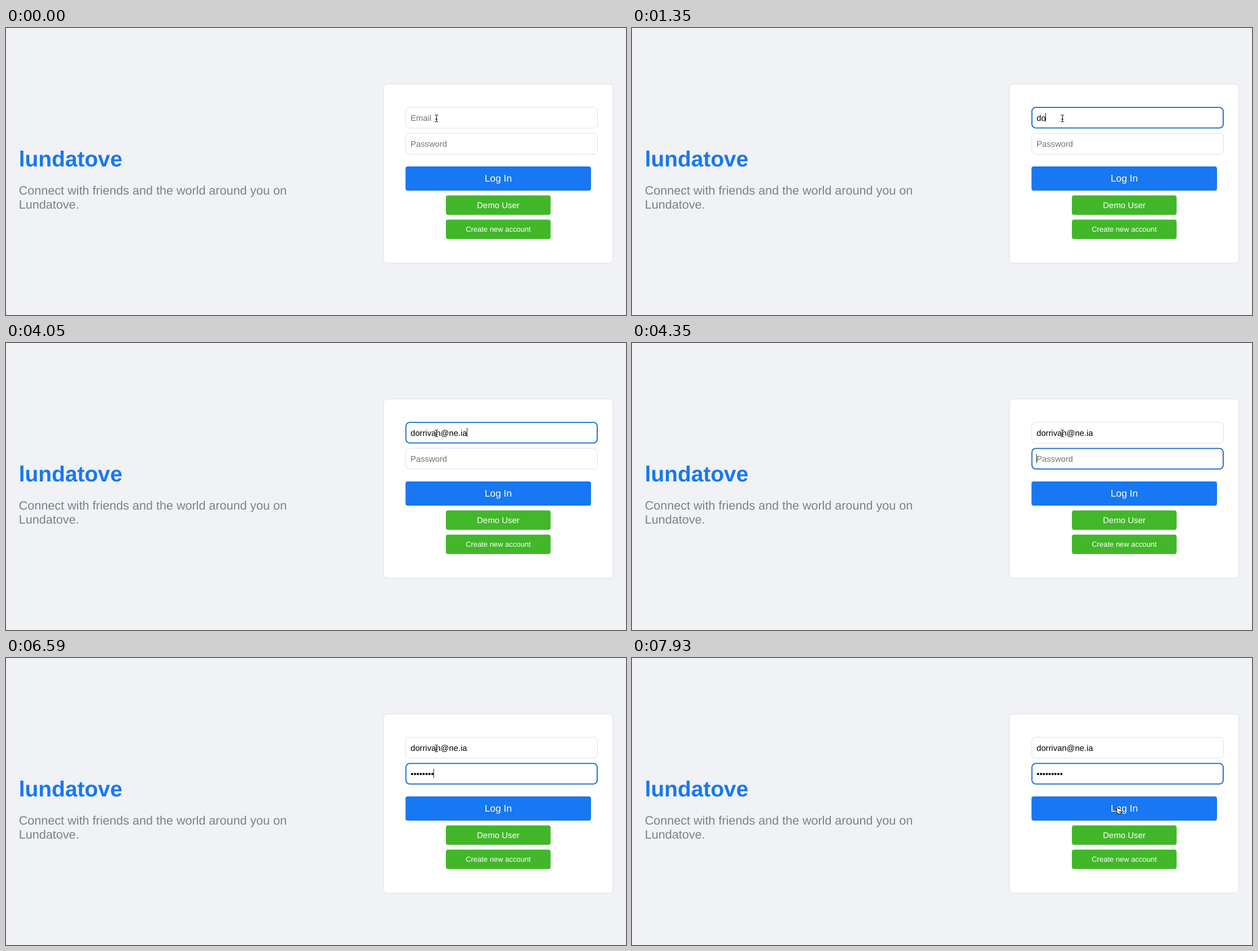
These frames come from a looping animation (1098 by 510 pixels, 8 s). An HTML page with a canvas:

```html
<!DOCTYPE html>
<html lang="en">
<head>
<meta charset="utf-8">
<title>Login</title>
<style>
  html, body { margin: 0; width: 100%; height: 100%; overflow: hidden; background: #f0f2f5; }
  canvas { display: block; }
</style>
</head>
<body>
<canvas id="stage" width="1098" height="510"></canvas>
<script>
const ctx = document.getElementById('stage').getContext('2d');
const LOOP = 8000;
const SANS = '"Liberation Sans", Arial, sans-serif';
const BLUE = '#1877f2', GREEN = '#42b72a', LINE = '#dddfe2';
const EMAIL = 'dorrivan@ne.ia';
const FIELD_FONT = 14.7, TEXT_X = 716.5;

// Keystrokes: [time, characters typed so far]
const emailKeys = [[1050, 1], [1350, 2], [1500, 3], [1650, 4], [2100, 5], [2250, 6],
  [2400, 7], [2550, 8], [3150, 9], [3450, 11], [3750, 12], [4050, 14]];
const passKeys = [[4800, 1], [4950, 2], [5100, 3], [6000, 4], [6300, 5], [6450, 7],
  [6590, 8], [7190, 9]];
const EMAIL_FOCUS = 450, PASS_FOCUS = 4350;
// Spans in which the caret is blinked off
const caretOff = [[900, 1050], [3000, 3150], [5550, 6000], [7630, LOOP]];

const MOVE_START = 7480, MOVE_STEP = 150;

function typed(keys, t) {
  let n = 0;
  for (const [at, count] of keys) if (t >= at) n = count;
  return n;
}

function box(x, y, w, h, r, fill, stroke, width = 1) {
  ctx.beginPath();
  ctx.roundRect(x, y, w, h, r);
  ctx.fillStyle = fill;
  ctx.fill();
  if (stroke) {
    ctx.strokeStyle = stroke;
    ctx.lineWidth = width;
    ctx.stroke();
  }
}

function text(str, x, y, size, color, align = 'left', weight = '') {
  ctx.font = `${weight} ${size}px ${SANS}`;
  ctx.textAlign = align;
  ctx.fillStyle = color;
  ctx.fillText(str, x, y);
}

function button(x, y, w, h, color, label, size, baseline) {
  box(x, y, w, h, 4, color);
  text(label, x + w / 2, baseline, size, '#fff', 'center');
}

function field(y, value, hint, focused, caret) {
  if (focused) box(708.3, y + 1.2, 338.7, 36.4, 6.5, '#fff', '#1264cb', 1.8);
  else box(708, y + 0.8, 339.5, 37.2, 6.5, '#fff', LINE);
  text(value || hint, TEXT_X, y + 24.6, FIELD_FONT, value ? '#000' : '#757575');
  if (focused && caret) {
    const x = Math.floor(TEXT_X + (value ? ctx.measureText(value).width : 0));
    ctx.fillStyle = '#222';
    ctx.fillRect(x, y + 11, 1, 16);
  }
}

function outlined(path, halo, ink, width) {
  ctx.lineJoin = ctx.lineCap = 'round';
  ctx.strokeStyle = halo;
  ctx.lineWidth = width + 1.4;
  ctx.stroke(path);
  ctx.strokeStyle = ink;
  ctx.lineWidth = width;
  ctx.stroke(path);
}

const beam = new Path2D('M-2.6-6Q-.4-6 0-4.6Q.4-6 2.6-6M0-4.6V4.8M-2.6 6.2Q-.4 6.2 0 4.8Q.4 6.2 2.6 6.2M-1.4 1.6H1.4');
const arrow = new Path2D('M-3-6V6L-.4 3.6 1.4 7.6 3.2 6.8 1.5 3H5Z');
const hand = new Path2D('M-2.6 2L-4.2-4.2Q-4.3-6.2-3-6.2Q-2-6.2-1.5-4.4L-.8-2Q.3-3.2 1.5-1.7Q2.7-2.7 3.6-1.2Q5.4-1.8 5.5.6Q5.6 3.4 4 5V7H-1.8V5.6L-5.4 1.4Q-6 .2-4.8-.1Q-4-.2-2.6 2Z');
const fingers = new Path2D('M.3 2V4.6M2 2V4.6M3.6 2V4.6');

function pointer(x, y) {
  ctx.save();
  ctx.translate(x, y);
  const inField = y < 179 || (y > 187 && y < 225);
  if (inField) {
    outlined(beam, 'rgba(255,255,255,.8)', '#111', 1.1);
  } else if (y < 246) {
    outlined(arrow, '#fff', '#fff', 0.6);
    ctx.fillStyle = '#000';
    ctx.fill(arrow);
  } else {
    ctx.fillStyle = '#fff';
    ctx.fill(hand);
    ctx.lineJoin = 'round';
    ctx.strokeStyle = '#000';
    ctx.lineWidth = 1;
    ctx.stroke(hand);
    ctx.lineWidth = 0.8;
    ctx.stroke(fingers);
  }
  ctx.restore();
}

function pointerAt(t) {
  const step = t < MOVE_START ? 0 : Math.floor((t - MOVE_START) / MOVE_STEP) + 1;
  const p = Math.min(step / 4, 1);
  const e = p * p * (3 - 2 * p);
  return [762.3 + 99.5 * e, 160.5 + 109.5 * e];
}

function draw(t) {
  ctx.fillStyle = '#f0f2f5';
  ctx.fillRect(0, 0, 1098, 510);

  text('lundatove', 22.8, 245.6, 38.8, BLUE, 'left', 'bold');
  text('Connect with friends and the world around you on', 22.8, 296, 21.55, '#808080');
  text('Lundatove.', 22.8, 321, 21.55, '#808080');

  box(668.7, 99.4, 406.2, 318.4, 7, '#fff', LINE);

  const caret = !caretOff.some(([from, to]) => t >= from && t < to);
  const onEmail = t >= EMAIL_FOCUS && t < PASS_FOCUS;
  field(140, EMAIL.slice(0, typed(emailKeys, t)), 'Email', onEmail, caret);
  field(186.2, '\u2022'.repeat(typed(passKeys, t)), 'Password', t >= PASS_FOCUS, caret);

  button(707.5, 246, 328.5, 43, BLUE, 'Log In', 17.25, 273.4);
  button(779, 297.5, 185.5, 34.5, GREEN, 'Demo User', 14.9, 320);
  button(779, 340.5, 185.5, 34.5, GREEN, 'Create new account', 12.95, 362);

  pointer(...pointerAt(t));
}

ctx.textRendering = 'geometricPrecision';
const start = performance.now();
function tick() {
  draw((performance.now() - start) % LOOP);
  requestAnimationFrame(tick);
}
tick();
</script>
</body>
</html>
```
